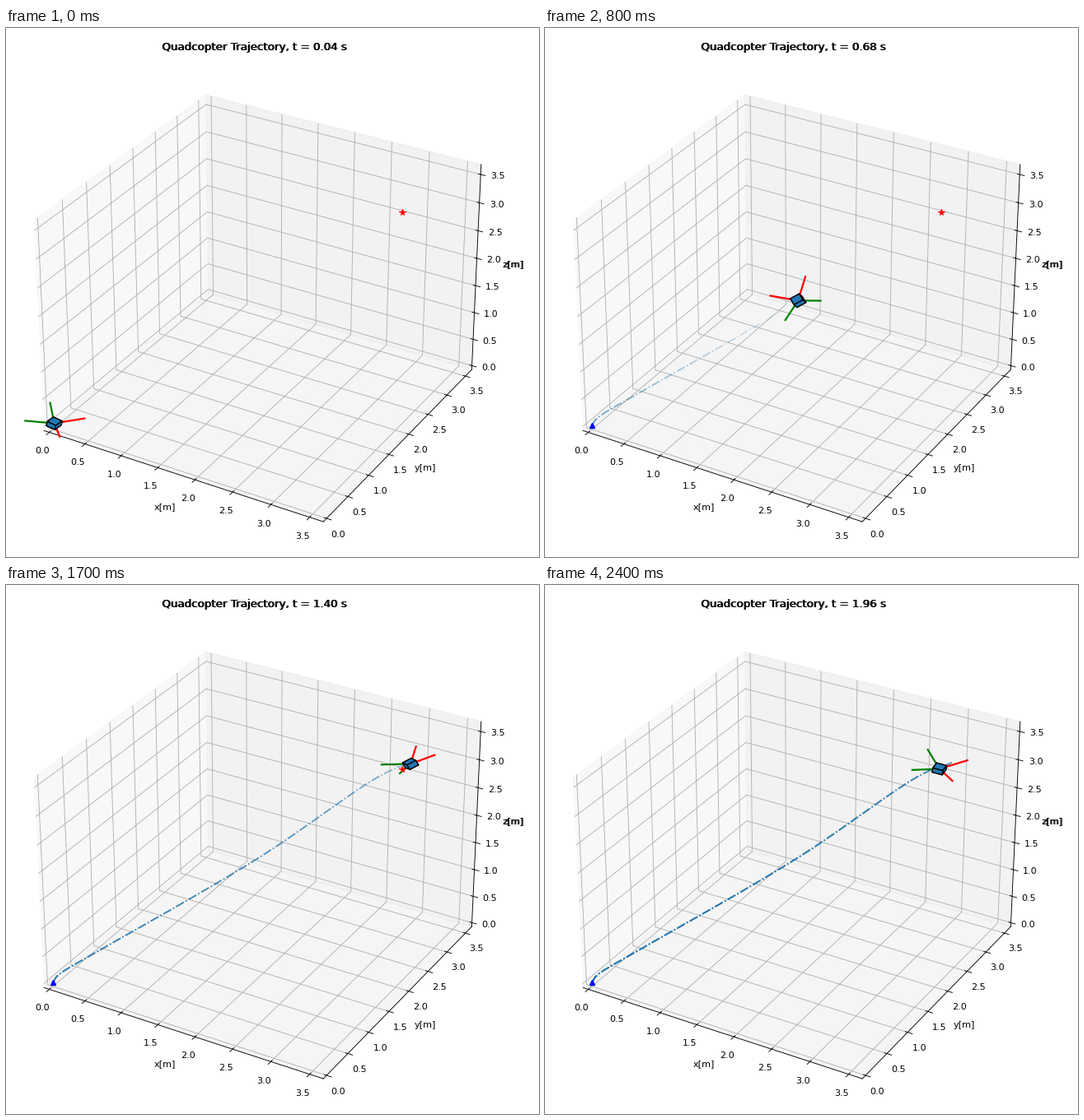
A matplotlib script that plays this animation: 647x643 px, repeating every 2450 ms.

```python
import itertools

import matplotlib.pyplot as plt
import numpy as np
from matplotlib.animation import FuncAnimation
from mpl_toolkits.mplot3d.art3d import Poly3DCollection

W, H, DPI = 647, 643, 80
FRAMES, INTERVAL, DT = 49, 50, 0.04
LIMITS = (-0.075, 3.675)
ARM, LIFT = 0.25, 0.072
HALF_BODY = np.array([0.0625, 0.0625, 0.04])

# time, horizontal advance along x = y, height
PATH = np.array([
    (0.00, 0.000, 0.000),
    (0.20, 0.098, 0.180),
    (0.36, 0.426, 0.487),
    (0.68, 1.777, 1.760),
    (0.96, 2.717, 2.850),
    (1.24, 3.064, 3.090),
    (1.60, 3.000, 3.018),
    (1.96, 2.986, 3.018),
])

# time, yaw, pitch, roll in degrees
POSE = np.array([
    (0.04, -2, 8, -3),
    (0.36, 82, 40, 18),
    (0.68, 141, -9.5, -32),
    (0.96, 147, -27.5, -103),
    (1.24, 93, -34, -38),
    (1.60, 25, 6, -7),
    (1.96, 7, 6, 4),
])


def smooth(keys, t):
    """Cubic Hermite curve through rows of (time, values...)."""
    times, vals = keys[:, 0], keys[:, 1:]
    slopes = np.gradient(vals, times, axis=0)
    k = int(np.clip(np.searchsorted(times, t) - 1, 0, len(times) - 2))
    h = times[k + 1] - times[k]
    u = (t - times[k]) / h
    return ((1 + 2 * u) * (1 - u) ** 2 * vals[k]
            + u * (1 - u) ** 2 * h * slopes[k]
            + u * u * (3 - 2 * u) * vals[k + 1]
            + u * u * (u - 1) * h * slopes[k + 1])


def position(t):
    s, z = smooth(PATH, t)
    return np.array([s, s, z])


def rotation(t):
    yaw, pitch, roll = np.radians(smooth(POSE, t))
    cy, sy = np.cos(yaw), np.sin(yaw)
    cp, sp = np.cos(pitch), np.sin(pitch)
    cr, sr = np.cos(roll), np.sin(roll)
    rz = np.array([[cy, -sy, 0], [sy, cy, 0], [0, 0, 1]])
    ry = np.array([[cp, 0, sp], [0, 1, 0], [-sp, 0, cp]])
    rx = np.array([[1, 0, 0], [0, cr, -sr], [0, sr, cr]])
    return rz @ ry @ rx


def box_faces():
    faces = []
    for axis, side in itertools.product(range(3), (-1, 1)):
        a, b = [k for k in range(3) if k != axis]
        face = np.full((4, 3), float(side))
        face[:, a] = (-1, 1, 1, -1)
        face[:, b] = (-1, -1, 1, 1)
        faces.append(face * HALF_BODY)
    return faces


def label(x, y, text, **kw):
    """Figure text placed in pixels from the top left."""
    return fig.text(x / W, 1 - y / H, text, ha="center", **kw)


fig = plt.figure(figsize=(W / DPI, H / DPI), dpi=DPI, facecolor="white")
SIDE = 603.7
ax = fig.add_axes([0.5 / W, 4.8 / H, SIDE / W, SIDE / H], projection="3d",
                  computed_zorder=False)
ax.view_init(elev=30, azim=-60)

# The title and the z label are each printed twice, one pixel apart.
titles = [label(x, 27.5, "", size=12, va="baseline") for x in (302.4, 301.4)]
ax.set_xlabel("x[m]")
ax.set_ylabel("y[m]")
ax.set_zlabel("z[m]")
label(615.3, 287, "z[m]", size=10, va="center")

# Faint trails pile up, so older stretches look darker.
times = DT * np.arange(FRAMES + 1)
points = np.array([position(t) for t in times])
trails = [ax.plot(*points[:n + 2].T, "-.", color="#1f77b4", lw=1.5,
                  alpha=0.07, zorder=3)[0] for n in range(FRAMES)]

ax.plot([0], [0], [0], "^", color="blue", ms=6, mew=1.3, zorder=3.5)
ax.plot([3], [3], [3], "*", color="red", ms=7, zorder=5)

rotors = [(ARM, ARM, LIFT), (ARM, -ARM, LIFT),
          (-ARM, ARM, LIFT), (-ARM, -ARM, LIFT)]
arms = [ax.plot([0, 0], [0, 0], [0, 0], color=c, lw=2, zorder=4)[0]
        for c in ("red", "red", "green", "green")]
faces = box_faces()
body = Poly3DCollection(faces, facecolors="#1f77b4", edgecolors="black",
                        linewidths=1.2, zorder=6)
ax.add_collection3d(body)

for axis in (ax.xaxis, ax.yaxis, ax.zaxis):
    axis.set_ticks(np.arange(0, 4, 0.5))
ax.set_xlim(LIMITS)
ax.set_ylim(LIMITS)
ax.set_zlim(LIMITS)


def update(i):
    t = times[i + 1]
    center, rot = points[i + 1], rotation(t)
    for title in titles:
        title.set_text(f"Quadcopter Trajectory, t = {t:.2f} s")
    for n, trail in enumerate(trails):
        trail.set_visible(n <= i)
    for arm, tip in zip(arms, rotors):
        arm.set_data_3d(*np.array([center, center + rot @ tip]).T)
    body.set_verts([center + face @ rot.T for face in faces])
    return []


anim = FuncAnimation(fig, update, frames=FRAMES, interval=INTERVAL,
                     repeat=True, repeat_delay=0, blit=False)
plt.show()
```
